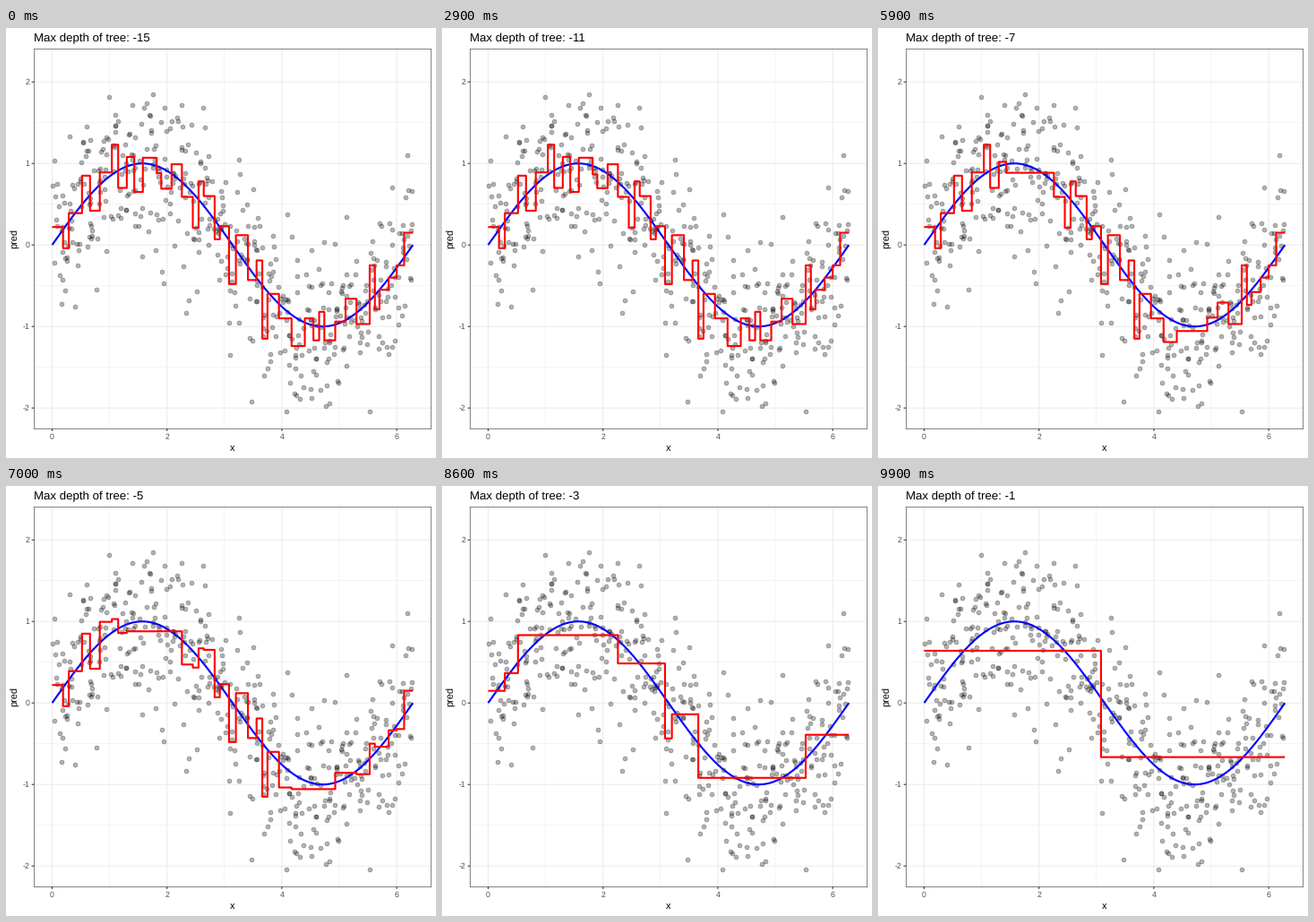
Recreate the animation shown at these times as a matplotlib script. Size 480 by 480 pixels, loop 10 s.

```python
import matplotlib.pyplot as plt
import numpy as np
from matplotlib.animation import FuncAnimation

SIZE, DPI = 480, 72
FRAMES, INTERVAL = 100, 100
MAX_DEPTH = 15
LEFT, RIGHT, TOP, BOTTOM = 31.4, 474.2, 23.4, 447.2
X0, Y0, SX, SY = 51.5, 242.2, 64.1, 91.0  # data origin and scale in pixels
DARK, GRID = "#333333", "#ebebeb"

plt.rcParams["font.family"] = "Liberation Sans"
plt.rcParams["text.hinting"] = "none"

# Left edge and level of each leaf of the full tree
STARTS = np.array([
    0, .19, .29, .52, .66, .83, 1.04, 1.15, 1.3, 1.43, 1.58, 1.82, 1.9, 2.08,
    2.26, 2.45, 2.55, 2.64, 2.83, 2.92, 3.08, 3.2, 3.41, 3.56, 3.66, 3.75,
    3.95, 4.17, 4.4, 4.55, 4.65, 4.74, 4.93, 5.11, 5.3, 5.53, 5.62, 5.7,
    5.86, 6, 6.13])
LEVELS = np.array([
    .22, -.04, .39, .85, .42, .89, 1.23, .7, 1.08, .65, 1.07, .88, .69, .99,
    .59, .21, .78, .6, .07, .23, -.48, .12, -.43, -.19, -1.15, -.6,
    -.9, -1.24, -.9, -1.17, -.82, -1.17, -.94, -.66, -.97, -.25, -.79, -.55,
    -.4, -.25, .15])
EDGES = np.append(STARTS, 2 * np.pi)
WIDTHS = np.diff(EDGES)


def grow(depths, lo, hi, depth=1):
    """Greedy regression tree: store the depth at which each edge is cut."""
    if hi - lo < 2:
        return
    w, y = WIDTHS[lo:hi], LEVELS[lo:hi]
    n = np.cumsum(w)
    s = np.cumsum(w * (y - np.average(y, weights=w)))[:-1]
    gain = s ** 2 / (n[:-1] * (n[-1] - n[:-1]))
    cut = lo + 1 + np.argmax(gain)
    depths[cut] = depth
    grow(depths, lo, cut, depth + 1)
    grow(depths, cut, hi, depth + 1)


def prune(depths, limit):
    """Leaf levels after merging every cut deeper than the limit."""
    group = np.cumsum(depths <= limit) - 1
    area = np.bincount(group, LEVELS * WIDTHS)
    return (area / np.bincount(group, WIDTHS))[group]


def make_samples():
    """Noisy samples whose mean in each leaf is the level of that leaf."""
    rng = np.random.default_rng(12)
    xs, ys = [], []
    for start, width, level in zip(STARTS, WIDTHS, LEVELS):
        n = max(round(width * 80), 3)
        noise = rng.normal(0, 0.5, n)
        xs.append(start + width * rng.random(n))
        ys.append(level + noise - noise.mean())
    return np.concatenate(xs), np.clip(np.concatenate(ys), -2.04, 2.2)


cuts = np.zeros(len(STARTS), int)
grow(cuts, 0, len(STARTS))
STATES = np.array([prune(cuts, d) for d in range(MAX_DEPTH, 0, -1)])

fig = plt.figure(figsize=(SIZE / DPI, SIZE / DPI), dpi=DPI, facecolor="white")
ax = fig.add_axes([LEFT / SIZE, 1 - BOTTOM / SIZE,
                   (RIGHT - LEFT) / SIZE, (BOTTOM - TOP) / SIZE])
ax.set_xlim((LEFT - X0) / SX, (RIGHT - X0) / SX)
ax.set_ylim((Y0 - BOTTOM) / SY, (Y0 - TOP) / SY)
ax.set_xticks([])
ax.set_yticks([])
for spine in ax.spines.values():
    spine.set(color=DARK, linewidth=0.6, zorder=10)


def label(x, y, text, size, color="black", **kw):
    return fig.text(x / SIZE, 1 - y / SIZE, text, fontsize=size, color=color,
                    va="baseline", **kw)


def tick(xs, ys):
    fig.add_artist(plt.Line2D(np.array(xs) / SIZE, 1 - np.array(ys) / SIZE,
                              color=DARK, lw=1.07, solid_capstyle="butt",
                              snap=False))


def grid(line, values, width):
    for v in values:
        line(v, color=GRID, lw=width, zorder=0, snap=False)


x_ticks, y_ticks = np.arange(0, 7, 2), np.arange(-2, 3)
grid(ax.axvline, x_ticks[:-1] + 1, 0.53)
grid(ax.axhline, y_ticks[:-1] + 0.5, 0.53)
grid(ax.axvline, x_ticks, 1.07)
grid(ax.axhline, y_ticks, 1.07)
for v in x_ticks:
    px = X0 + SX * v
    tick([px, px], [BOTTOM, BOTTOM + 2.75])
    label(px, 458.8, str(v), 8.8, "#4d4d4d", ha="center")
for v in y_ticks:
    py = Y0 - SY * v
    tick([LEFT - 2.75, LEFT], [py, py])
    label(26.4, py + 3.15, str(v), 8.8, "#4d4d4d", ha="right")

label((LEFT + RIGHT) / 2, 472, "x", 11, ha="center")
label(13.4, (TOP + BOTTOM) / 2, "pred", 11, ha="center",
      rotation=90, rotation_mode="anchor")
title = label(LEFT, 15, "", 13.2, ha="left")

ax.scatter(*make_samples(), s=25, facecolor=(0, 0, 0, 0.3),
           edgecolor=(0, 0, 0, 0.3), linewidth=0.71, zorder=2)
wave = np.linspace(0, 2 * np.pi, 400)
ax.plot(wave, np.sin(wave), color="#0000ff", lw=2.13, solid_capstyle="butt",
        zorder=3)
steps, = ax.plot([], [], color="#ff0000", lw=2.13, solid_capstyle="butt",
                 snap=False, zorder=4)


def update(i):
    pos = (MAX_DEPTH - 1) * i / (FRAMES - 1)
    k = min(int(pos), MAX_DEPTH - 2)
    f = pos - k
    levels = (1 - f) * STATES[k] + f * STATES[k + 1]
    steps.set_data(np.repeat(EDGES, 2)[1:-1], np.repeat(levels, 2))
    title.set_text(f"Max depth of tree: {round(pos - MAX_DEPTH)}")
    return steps, title


anim = FuncAnimation(fig, update, frames=FRAMES, interval=INTERVAL,
                     repeat=True, repeat_delay=0)
plt.show()
```
